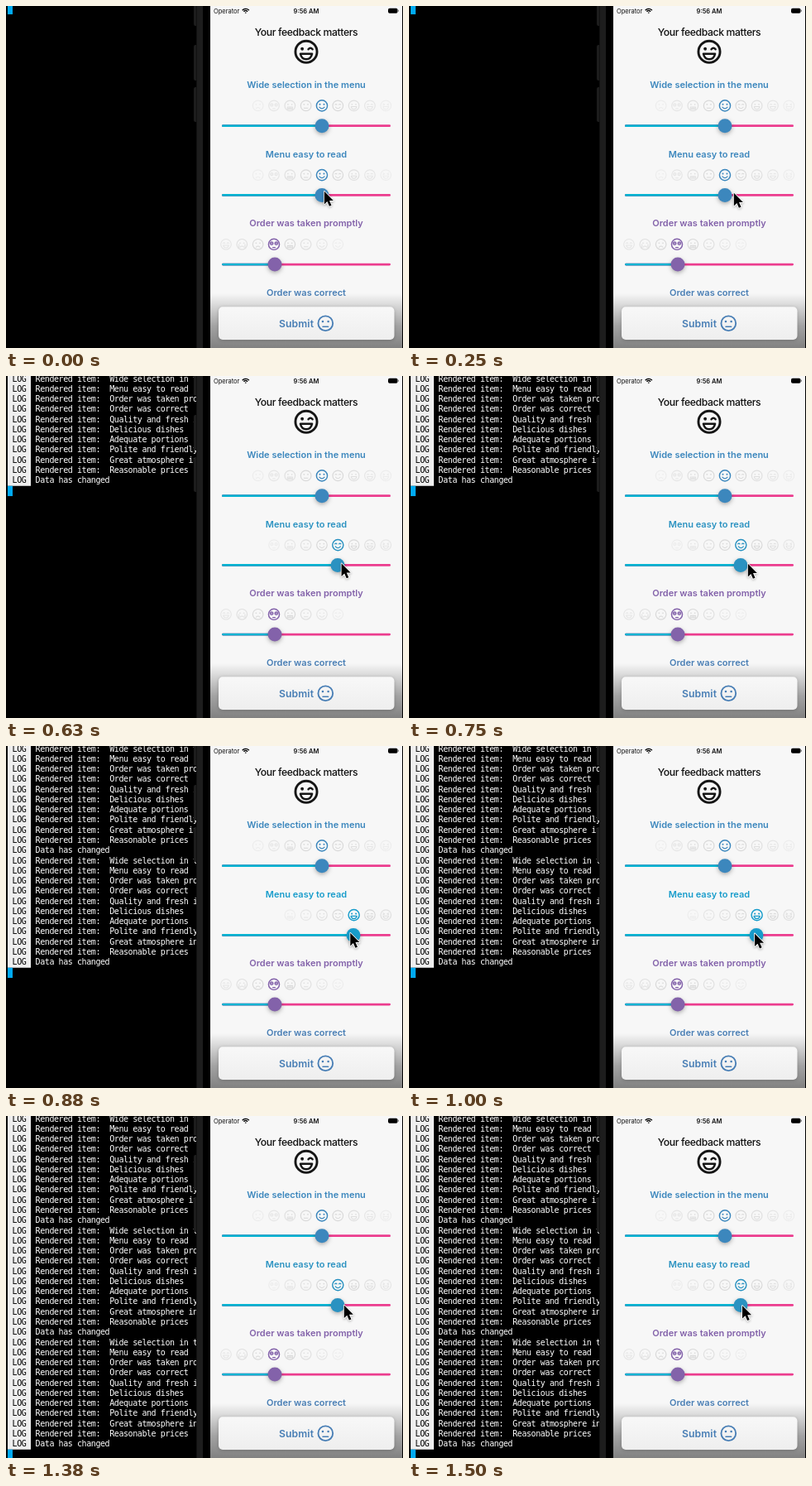
Write an HTML page with a canvas that moves like this. It is 480x413 px and loops after 1620 ms.

```html
<!DOCTYPE html>
<html lang="en">
<head>
<meta charset="utf-8">
<title>Feedback sliders</title>
<style>
html, body { margin: 0; width: 100%; height: 100%; overflow: hidden; background: #000; }
canvas { display: block; }
</style>
</head>
<body>
<canvas width="480" height="413"></canvas>
<script>
const ctx = document.querySelector('canvas').getContext('2d');
const LOOP = 1620, STEP = 125, CENTER = 363, LINE = 12.27;

const ITEMS = ['Wide selection in the menu', 'Menu easy to read', 'Order was taken promptly',
  'Order was correct', 'Quality and fresh ingredients', 'Delicious dishes', 'Adequate portions',
  'Polite and friendly staff', 'Great atmosphere inside', 'Reasonable prices'];
const LOG = [...ITEMS.map(item => 'Rendered item:  ' + item), 'Data has changed'];
const TINT = { 3: '#8362aa', 5: '#487eb5', 6: '#3c87bd', 7: '#2a92c1', 8: '#179ccb' };

// Pointer tip: time, x, y
const POINTER = [[0, 384.8, 223.8], [250, 392.8, 225.8], [380, 396.8, 225.3], [750, 409.8, 226.8],
  [880, 416.3, 225.8], [1065, 418.8, 226.8], [1250, 415, 228], [1500, 403, 229]];

// Face parts, drawn inside a circle of radius 8
const ring = (x, y, r) => `M${x - r} ${y}a${r} ${r} 0 1 0 ${2 * r} 0a${r} ${r} 0 1 0 ${-2 * r} 0`;
const pair = (x, y, r) => ring(-x, y, r) + ring(x, y, r);
const DOTS = pair(2.7, -1.8, .4);
const ARCS = 'M-4-1.4q1.3-1.7 2.6 0M1.4-1.4q1.3-1.7 2.6 0';
const RINGS = pair(3.1, -1.2, 1.9) + pair(3.1, -1.2, .2);
const SQUINT = 'M-4-2.8l2.2 1.2-2.2 1.2M4-2.8l-2.2 1.2 2.2 1.2';
const FROWN = 'M-2.7 4q2.7-3 5.4 0', FLAT = 'M-2.7 3.3h5.4', SMILE = 'M-3.3 1.9q3.3 4 6.6 0';
const GRIN = 'M-3.9 1.3h7.8q-.8 3.6-3.9 3.6t-3.9-3.6z';
const TEETH = 'M-3.6 1.8h7.2v2.8h-7.2zM-1.2 1.8v2.8M1.2 1.8v2.8';
const FACES = [ARCS + GRIN, DOTS + FROWN + 'M-4.2 0v4M4.2 0v4', DOTS + FROWN, RINGS + 'M-1.6 4.2h3.2',
  DOTS + TEETH, DOTS + FLAT, DOTS + SMILE, ARCS + SMILE, DOTS + GRIN, ARCS + GRIN, SQUINT + GRIN]
  .map(d => new Path2D(d));
const WINK = new Path2D(ring(-2.7, -2, .4) + 'M1.4-1.7q1.4-1.7 2.8 0' + GRIN);
const ARROW = new Path2D('M0 0V15.6L3.6 12.3 6.1 18 8.7 16.9 6.2 11.3H11.1Z');

function box(x, y, w, h, color, r = 0) {
  ctx.fillStyle = color;
  ctx.beginPath();
  ctx.roundRect(x, y, w, h, r);
  ctx.fill();
}

function text(str, x, y, font, color, align = 'left', spacing = 0) {
  ctx.font = font;
  ctx.fillStyle = color;
  ctx.textAlign = align;
  ctx.letterSpacing = spacing + 'px';
  ctx.fillText(str, x, y);
}

function shadow(color, blur, y) {
  ctx.shadowColor = color;
  ctx.shadowBlur = blur;
  ctx.shadowOffsetY = y;
}

function face(path, x, y, r, color, weight) {
  ctx.save();
  ctx.translate(x, y);
  ctx.scale(r / 8, r / 8);
  ctx.strokeStyle = color;
  ctx.lineWidth = weight;
  ctx.lineCap = ctx.lineJoin = 'round';
  ctx.beginPath();
  ctx.arc(0, 0, 8 - weight / 2, 0, 7);
  ctx.stroke();
  ctx.lineWidth = weight * .85;
  ctx.stroke(path);
  ctx.restore();
}

function terminal(blocks) {
  box(0, 0, 240, 413, '#000');
  const font = '10px "DejaVu Sans Mono", monospace', spacing = -.42;
  const rows = blocks * LOG.length, top = -2.2;
  if (rows) box(2, 0, 28, rows * LINE + top, '#efefef');
  for (let i = 0; i < rows; i++) {
    const y = top + i * LINE + 8.8;
    text('LOG', 7.6, y, font, '#000', 'left', spacing);
    text(LOG[i % LOG.length], 35.6, y, font, '#fff', 'left', spacing);
  }
  box(2, top + rows * LINE, 6, LINE, '#00aaf5');
}

function phone() {
  for (const [y, h] of [[-4, 28], [47, 43], [98, 42]]) box(227, y, 5, h, '#1d1d1d', 2);
  box(230, 0, 10, 413, '#1d1d1d');
  box(230, 0, 1, 413, '#111');
  box(238, 0, 242, 413, '#000');
  box(247, 0, 232, 413, '#f7f7f7');

  text('Operator', 251, 8.7, '7.5px Inter, sans-serif', '#111');
  text('9:56 AM', CENTER, 8.7, '600 7.5px Inter, sans-serif', '#111', 'center');
  ctx.strokeStyle = '#000';
  ctx.lineWidth = 1.4;
  ctx.lineCap = 'butt';
  for (const r of [.8, 3.2, 5.6]) {
    ctx.beginPath();
    ctx.arc(289.8, 9, r, -Math.PI * .76, -Math.PI * .24);
    ctx.stroke();
  }
  box(462, 2.7, 11.5, 6, '#000', 1.8);
  box(474, 4.7, .9, 2, '#777');

  text('Your feedback matters', CENTER, 35.6, '500 12.2px Inter, sans-serif', '#111', 'center', -.37);
  face(WINK, CENTER, 55.3, 14.5, '#161616', 1.6);
}

function question(index, value) {
  const y = 95 + index * 83.7, color = TINT[value];
  text(ITEMS[index], CENTER, y + 4, '600 11px Inter, sans-serif', color, 'center');
  if (index > 2) return;
  FACES.forEach((path, i) => {
    const distance = Math.abs(i - value), x = 266 + i * 19.33;
    if (!distance) face(path, x, y + 25.4, 7.3, color, 1.6);
    else if (distance < 5) face(path, x, y + 25.4, 6.9, `rgba(0,0,0,${.145 - distance * .025})`, 1.4);
  });
  const thumb = 268 + value * 19, track = y + 49.7;
  box(261, track - 1.35, 204, 2.7, '#ec3c8e', 1.35);
  box(261, track - 1.35, thumb - 261, 2.7, '#06b4d2', 1.35);
  ctx.save();
  shadow('rgba(0,0,0,.3)', 5, 2);
  box(thumb - 8.5, track - 8.5, 17, 17, color, 8.5);
  ctx.restore();
}

function footer() {
  const fade = ctx.createLinearGradient(0, 347, 0, 413);
  fade.addColorStop(0, 'rgba(0,0,0,0)');
  fade.addColorStop(.6, 'rgba(0,0,0,.34)');
  fade.addColorStop(1, 'rgba(0,0,0,.48)');
  box(247, 347, 232, 66, fade);
  const shine = ctx.createLinearGradient(0, 363, 0, 403);
  shine.addColorStop(0, '#f8f8f8');
  shine.addColorStop(1, '#eeeeee');
  ctx.save();
  shadow('rgba(0,0,0,.2)', 4, 1);
  box(257, 363.2, 212.5, 39.8, shine, 5);
  ctx.restore();
  text('Submit', 330, 387.7, '600 12.2px Inter, sans-serif', TINT[5], 'left', .1);
  face(FACES[5], 386.3, 383.2, 9.8, TINT[5], 1.5);
}

function pointer(time) {
  const next = POINTER.findIndex(key => key[0] >= time);
  const b = POINTER[next], a = POINTER[Math.max(0, next - 1)];
  const k = (time - a[0]) / (b[0] - a[0] || 1);
  ctx.save();
  ctx.translate(a[1] + (b[1] - a[1]) * k, a[2] + (b[2] - a[2]) * k);
  shadow('rgba(0,0,0,.3)', 3, 1);
  ctx.lineJoin = 'round';
  ctx.lineWidth = 1.7;
  ctx.strokeStyle = '#fff';
  ctx.stroke(ARROW);
  shadow('transparent', 0, 0);
  ctx.fillStyle = '#000';
  ctx.fill(ARROW);
  ctx.restore();
}

function draw() {
  const time = performance.now() % LOOP;
  const step = Math.floor(Math.floor(time / 10) * 10 / STEP);
  const changes = Math.floor((step + 1) / 4);
  terminal(changes);
  phone();
  [6, [6, 7, 8, 7][changes], 3, 5].forEach((value, i) => question(i, value));
  footer();
  pointer(Math.min(1500, Math.ceil(step * STEP / 10) * 10));
  requestAnimationFrame(draw);
}
draw();
</script>
</body>
</html>
```
